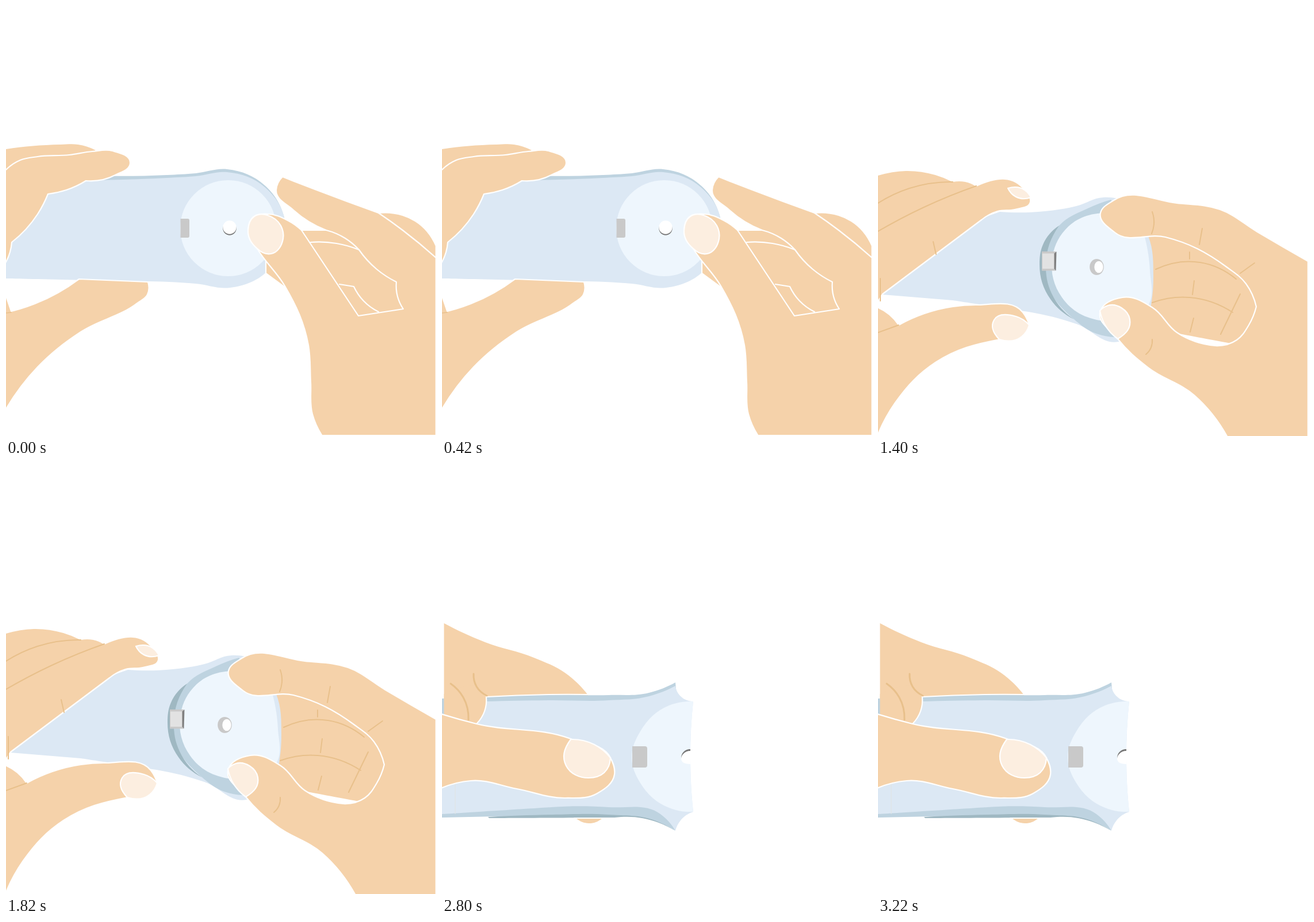
Write an HTML page with a canvas that moves like this. It is 748 px wide and 748 px high and loops after 3500 ms.

```html
<!DOCTYPE html>
<html lang="en">
<head>
<meta charset="utf-8">
<title>Folding a pouch</title>
<style>
html, body { margin: 0; width: 100%; height: 100%; overflow: hidden; background: #fff; }
canvas { display: block; width: 100vw; height: 100vh; }
</style>
</head>
<body>
<canvas id="stage" width="748" height="748"></canvas>
<script>
const ctx = document.getElementById('stage').getContext('2d');
const STEP = 700;
const SKIN = '#f5d2aa', NAIL = '#fceee0', CREASE = '#e8c08b';
const BAG = '#dce8f4', DISC = '#eef6fd', EDGE = '#bed3e0', DEEP = '#9fb8c2';
const GREY = '#c9c9c9', DARK = '#808080', WHITE = '#fff';

// Direction of the curve at b on its way from a to c.
function tangent(a, b, c) {
  const near = Math.hypot(b[0] - a[0], b[1] - a[1]) ** 2;
  const far = Math.hypot(c[0] - b[0], c[1] - b[1]) ** 2;
  const t = [0, 1].map(k => (b[k] - a[k]) / near + (c[k] - b[k]) / far);
  const length = Math.hypot(...t);
  return t.map(v => v / length);
}

// Control point beside a; an end without a tangent bends freely.
function control(a, b, ta, tb) {
  const reach = Math.hypot(b[0] - a[0], b[1] - a[1]);
  return [0, 1].map(k => {
    if (ta) return a[k] + ta[k] * reach * 0.36;
    if (tb) return a[k] + (b[k] + tb[k] * reach / 2 - a[k]) * 2 / 3;
    return a[k];
  });
}

// Smooth line through "x,y" points; a slash makes the point before it a corner.
function trace(text) {
  const path = new Path2D();
  let last;
  for (const run of text.split('/')) {
    const pts = run.trim().split(/\s+/).map(p => p.split(',').map(Number));
    if (last) pts.unshift(last);
    else path.moveTo(...pts[0]);
    const dirs = pts.map((p, i) => i && i < pts.length - 1 && tangent(pts[i - 1], p, pts[i + 1]));
    const back = dirs.map(d => d && d.map(v => -v));
    for (let i = 1; i < pts.length; i++) {
      const a = pts[i - 1], b = pts[i];
      path.bezierCurveTo(...control(a, b, dirs[i - 1], back[i]), ...control(b, a, back[i], dirs[i - 1]), ...b);
    }
    last = pts[pts.length - 1];
  }
  return path;
}

function fill(color, points) {
  ctx.fillStyle = color;
  ctx.fill(trace(points));
}
function line(points, color = WHITE, width = 2.2) {
  ctx.strokeStyle = color;
  ctx.lineWidth = width;
  ctx.stroke(trace(points));
}
function shape(color, points) {
  fill(color, points);
  line(points);
}
const skin = points => shape(SKIN, points);
const nail = points => shape(NAIL, points);
const lines = (...list) => list.forEach(points => line(points));
const creases = (...list) => list.forEach(points => line(points, CREASE, 2));

function oval(color, x, y, rx, ry = rx, turn = 0) {
  ctx.fillStyle = color;
  ctx.beginPath();
  ctx.ellipse(x, y, rx, ry, turn, 0, Math.PI * 2);
  ctx.fill();
}
function box(color, x, y, w, h, corners = 0) {
  ctx.fillStyle = color;
  ctx.beginPath();
  ctx.roundRect(x, y, w, h, corners);
  ctx.fill();
}
function cube(x, y, w, h) {
  const right = x + w, low = y + h, rim = 3.5;
  box(GREY, x - 1, y - rim, w + rim, h + rim * 2);
  box('#e2e2e2', x, y, w, h);
  fill(DARK, `${right},${y} / ${right + 4},${y - rim} / ${right + 3},${low + rim} / ${right},${low}`);
}

function flatPouch() {
  fill(EDGE, '150,295 / 280,294 330,291 385,284 450,312 487,382 / 388,400');
  fill(BAG, '0,300 / 280,299 330,296 385,289 450,315 486,378 458,458 390,490 330,483 240,479 / 0,474');
  oval(DISC, 386.5, 386.5, 83.5);
  box(GREY, 303.5, 370, 15.5, 33, [0, 3, 3, 0]);
  oval('#777', 389, 387, 11.7);
  oval(WHITE, 389, 385, 11.7);

  fill(SKIN, '0,249 / 95,241 125,241 156,251 / 100,290 / 0,290');
  skin('-4,289 25,268 55,262 110,259 150,253 185,252 216,273 190,294 139,304 / 105,320 73,327 / 55,362 10,411 / 7,428 -4,452');
  skin('-4,534 50,518 127,475 / 247,480 / 246,502 228,517 130,567 55,628 -4,708');
  fill(SKIN, '0,508 / 9,534 / 0,534');
  line('0,534 / 9,533', CREASE, 1.5);

  skin('452,443 452,465 / 486,490 / 478,455');
  skin('549,746 533,710 530,655 526,590 485,487 437,422 422,394 430,367 455,362 490,373 514,390 / 557,390 / 500,355 470,320 481,297 / 540,320 648,360 / 690,364 712,374 748,417 / 748,746');
  lines('514,390 / 613,539 / 691,527 / 681,505 679,480 / 645,458 614,424 / 575,413 530,411',
    '557,390 590,404 614,424', '648,360 690,390 748,438', '580,484 / 605,488 / 622,513 648,532');
  nail('437,422 421,390 432,366 455,364 / 478,382 482,405 461,431 437,422');
}

function liftedEnd() {
  fill(SKIN, '523,420 / 502,472 / 541,518 / 565,513 / 558,450');
  fill(EDGE, '290,320 / 405,319 / 390,340');
  fill(EDGE, '495,390 / 523,420 517,450 502,473 / 488,462');
  fill(BAG, '88,460 / 290,323 350,326 400,320 440,310 482,321 / 507,400 506,440 499,470 / 443,516 385,494 300,485 / 197,475');
  fill(EDGE, '414,331 373,362 355,412 380,475 438,511 / 450,460 / 440,350');
  fill(DISC, '412,333 378,365 367,404 380,445 412,473 / 488,464 495,430 494,398 / 440,350');
  cube(362, 396.5, 18, 23);
  oval(GREY, 438.5, 408, 8.8, 10.7);
  oval(WHITE, 441, 408, 8, 9.7);

  fill(SKIN, '0,224 60,229 131,250 / 160,300 / 0,400');
  skin('-4,322 60,272 113,251 170,254 230,261 250,271 / 265,267 300,276 335,289 / 333,303 305,320 250,334 185,378 / 93,442 / 88,460 67,482 / 78,494 82,507 / 130,500 205,472 245,470 300,485 317,500 / 305,518 268,531 170,572 90,637 -4,746');
  lines('248,271 150,306 8,372', '102,428 92,452 67,482');
  nail('303,278 / 335,289 / 335,297 316,295 300,291 303,278');
  nail('305,488 280,491 262,502 / 267,531 / 300,521 317,503 305,488');
  creases('39,269 40,282 34,293', '46,469 67,482', '48,521 65,510 84,506');

  skin('533,750 500,640 470,550 429,494 408,466 430,446 500,465 541,518 557,525 566,495 540,438 500,401 440,372 408,342 430,324 510,329 582,368 / 610,358 640,355 670,373 748,424 / 748,748');
  lines('515,455 / 542,442', '530,500 / 566,490');
  nail('412,452 428,452 443,466 / 438,483 429,496 / 410,475 412,452');
  creases('583,368 630,402 684,444', '548,527 567,562');
}

function narrowedEnd() {
  fill(SKIN, '460,380 / 640,400 / 670,520 / 630,590 / 470,560');
  fill(BAG, '8,502 / 180,370 212,358 / 290,357 345,348 392,333 421,336 / 470,400 479,470 475,520 / 418,584 345,553 262,532 / 130,512');
  fill(EDGE, '405,337 365,352 315,382 286,450 340,544 380,570 412,576 / 440,520 / 440,380');
  fill(DISC, '392,360 325,390 303,440 320,507 392,548 / 470,521 473,460 463,398');
  fill(DEEP, '315,382 287,415 281,450 300,510 341,545 / 302,500 292,450 315,382');
  cube(286, 430.5, 20.5, 26.5);
  oval(GREY, 380.5, 454, 12.3, 14);
  oval(WHITE, 384, 454, 7.7, 10.3);

  skin('-4,295 100,293 130,305 / 152,305 171,313 / 255,320 265,341 238,354 208,357 180,372 / 8,501 / -4,520');
  nail('226,317 / 255,320 266,333 / 240,332 226,317');
  skin('-4,523 20,537 36,555 / 130,523 170,520 252,533 263,555 / 250,575 212,580 100,620 30,690 -4,755');
  nail('211,580 202,546 240,540 263,555 / 250,575 211,580');
  creases('0,343 55,317 130,306', '0,392 80,350 171,313', '96,410 101,432', '4,474 4,513', '0,568 / 36,555');

  skin('608,750 550,677 470,629 417,579 387,530 425,507 478,525 520,568 587,591 / 624,581 645,555 658,523 / 640,483 605,453 500,402 412,394 387,360 410,338 520,343 595,354 660,393 748,444 / 748,748');
  nail('386,530 400,521 438,545 417,579 / 395,555 386,530');
  creases('477,358 480,380 476,396', '564,387 559,415', '542,428 542,440', '483,458 560,446 623,475', '630,465 655,447',
    '477,516 542,507 617,533', '550,478 547,502', '630,501 596,571', '549,543 543,567', '477,580 475,594 466,606');
}

function foldedRound() {
  fill(SKIN, '0,461 95,415 165,365 225,341 306,350 / 300,500 / 268,605 / 173,646 148,695 106,748 / 0,748');
  fill(SKIN, '463,748 450,690 425,629 375,606 345,604 333,588 / 420,450 / 408,362 443,334 540,384 630,460 666,530 678,746');
  fill(BAG, '226,391 240,379 / 302,351 332,337 / 345,345 / 320,500 / 350,586 320,589 280,575 245,556 199,543');
  fill(EDGE, '334,337 366,354 / 440,380 465,440 445,520 352,588 / 320,584 295,577 266,510 262,440 295,378 / 325,355 334,337');
  fill('#c2ced3', '388,356 440,380 463,440 430,535 352,588 / 420,450');
  fill(DEEP, '295,378 264,412 253,465 266,530 295,577 / 262,490 268,425 295,378');
  line('338,353 380,354 420,367', '#c7c9ca', 2);
  line('282,537 320,567 383,571', '#c7c9ca', 2);
  line('446,387 463,440 443,523', GREY, 3.5);
  fill(DISC, '388,375 440,395 458,440 425,535 370,562 305,535 282,470 315,400 388,375');
  fill('#dfe8ed', '388,375 440,395 458,440 425,535 370,562 / 356,561 / 385,480 388,375');
  oval(GREY, 384, 467, 15, 12.3, 0.25);
  oval(SKIN, 383, 466, 8.5, 8.2);
  fill(WHITE, '283,435 266,460 278,480 / 287,445');
  fill(DARK, '279,434 / 286,435 / 282,474 / 279,480 / 274,480');
  fill(GREY, '274,442 / 290,436 / 284,473 / 271,474');
  fill(DARK, '286,442 / 293,437 / 288,474 / 281,472');

  skin('443,334 418,342 408,362 425,385 490,425 560,501');
  skin('623,643 480,548 425,525 388,560 425,608 500,658 542,727');
  nail('410,550 420,542 445,543 458,553 / 436,590 413,585 410,550');
  skin('56,605 190,549 245,556 267,565 / 273,590 268,605 / 225,624 173,646 130,675 110,713 93,729');
  nail('205,572 220,565 247,600 228,605 205,572');
  creases('498,382 485,405', '545,424 533,443', '518,505 538,500', '461,484 / 498,512', '497,516 485,542', '593,570 572,591', '587,602 604,594');
  creases('213,380 217,389 229,391', '139,427 158,448', '153,475 181,495', '186,487 196,474 212,468', '189,506 202,529', '123,487 / 101,546', '51,534 / 101,546 117,559 125,581');
}

function foldedFlat() {
  fill(SKIN, '234,617 255,625 278,617');
  fill(SKIN, '3.5,277 75,310 160,337 215,364 254,402 / 240,450 / 3.5,450');
  fill(EDGE, '0,408 / 77,405 / 185,401 290,402 360,398 406,380 / 408,400 / 0,470');
  fill(EDGE, '0,615 / 190,612 290,612 360,618 406,638 / 380,570 / 0,570');
  fill(DEEP, '80,614 / 190,610 290,610 370,620 405,638 / 377,624 300,615 / 82,616');
  fill(BAG, '0,450 / 77,413 / 185,411 290,411 360,404 406,386 / 415,404 437,413 / 432,510 437,605 / 415,620 406,638 / 380,609 290,597 190,597 / 0,609');
  line('77,405 / 185,401 254,401', WHITE, 2);
  line('230,616 / 283,616', WHITE, 2);
  line('23,555 / 23,608', '#dfe6e9', 1.5);
  fill(DISC, '437,413 395,420 345,465 330,510 345,555 395,598 437,605 / 432,510 437,413');
  box(GREY, 331, 491, 26, 37, [0, 4, 4, 0]);
  fill('#777', '432,496 420,501 416,513 / 432,505');
  fill(WHITE, '432,499 420,504 416,512 432,522');

  fill(SKIN, '3.5,400 / 77,405 74,430 61,451 / 3.5,445');
  line('77,405 74,430 61,451');
  skin('-4,434 60,452 224,478 293,511 300,540 270,573 215,581 130,565 50,551 -4,565');
  nail('224,479 / 265,488 293,511 / 282,537 255,546 216,525 224,479');
  line('55,365 60,387 78,403', CREASE, 3);
  line('15,382 37,406 46,445', CREASE, 3);
}

const poses = [flatPouch, liftedEnd, narrowedEnd, foldedRound, foldedFlat];
const start = performance.now();
let shown = -1;

function draw() {
  const index = Math.floor((performance.now() - start) / STEP) % poses.length;
  if (index !== shown) {
    shown = index;
    box(WHITE, 0, 0, 748, 748);
    poses[index]();
  }
  requestAnimationFrame(draw);
}
ctx.lineCap = 'round';
ctx.lineJoin = 'round';
draw();
</script>
</body>
</html>
```
